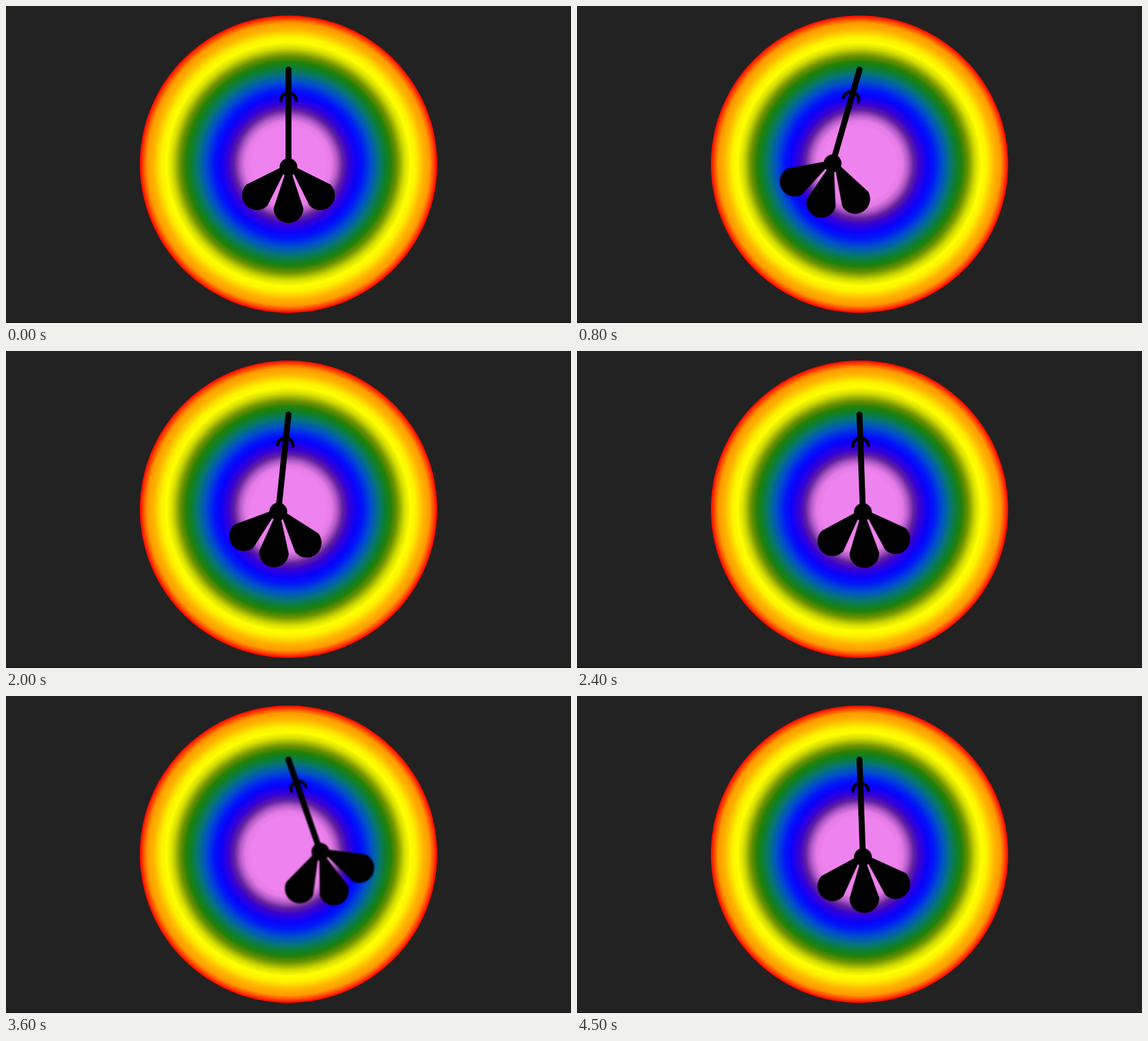
Write an HTML page that moves like this. It is 950 px wide and 533 px high and loops after 4.6 s.

```html
<!DOCTYPE html>
<html lang="en">
<head>
<meta charset="utf-8">
<title>Rainbow pendulum</title>
<style>
  html, body { margin: 0; width: 100%; height: 100%; overflow: hidden; background: #222; }
  svg { display: block; width: 950px; height: 533px; }
</style>
</head>
<body>
<svg viewBox="0 0 950 533">
  <defs>
    <radialGradient id="rainbow" gradientUnits="userSpaceOnUse" cx="475" cy="266" r="250">
      <stop offset=".25" stop-color="#ee82ee"/>
      <stop offset=".29" stop-color="#e47be6"/>
      <stop offset=".325" stop-color="#b45bc9"/>
      <stop offset=".365" stop-color="#60209f"/>
      <stop offset=".405" stop-color="#3800d2"/>
      <stop offset=".46" stop-color="#0c00fa"/>
      <stop offset=".5" stop-color="#0016fa"/>
      <stop offset=".56" stop-color="#0052c8"/>
      <stop offset=".61" stop-color="#077478"/>
      <stop offset=".66" stop-color="#0f8024"/>
      <stop offset=".69" stop-color="#268008"/>
      <stop offset=".73" stop-color="#6e9200"/>
      <stop offset=".78" stop-color="#d4dc00"/>
      <stop offset=".82" stop-color="#ffff00"/>
      <stop offset=".855" stop-color="#fff200"/>
      <stop offset=".91" stop-color="#ffb400"/>
      <stop offset=".95" stop-color="#ff9a00"/>
      <stop offset=".975" stop-color="#ff5000"/>
      <stop offset="1" stop-color="#ff0000"/>
    </radialGradient>
    <path id="leaf" d="M475 265 L450 340 A25 25 0 1 0 500 340 Z"/>
  </defs>
  <rect width="950" height="533" fill="#222"/>
  <rect y="532" width="950" height="1" fill="#111"/>
  <circle cx="475" cy="266" r="250" fill="url(#rainbow)"/>
  <g id="pendulum">
    <g fill="none" stroke="#000" stroke-linecap="round">
      <path d="M475 107 V271" stroke-width="10"/>
      <path d="M462 159.5 A13 13 0 0 1 488 159.5" stroke-width="5"/>
    </g>
    <circle cx="475" cy="271" r="15"/>
    <use href="#leaf"/>
    <use href="#leaf" transform="rotate(45 475 265)"/>
    <use href="#leaf" transform="rotate(-45 475 265)"/>
  </g>
</svg>
<script>
  const LOOP = 4600, STEP = 100, HALF = LOOP / STEP / 2;
  const SPEED = 2, TURN = 3.2; // degrees per step, steps spent slowing down
  const pendulum = document.getElementById("pendulum");

  // Steady swing with a rounded turn at each end
  function angleAt(step) {
    const side = step < HALF ? 1 : -1;
    const d = Math.abs(step % HALF - HALF / 2);
    const lag = d > TURN ? d : (TURN + d * d / TURN) / 2;
    return side * SPEED * (HALF / 2 - lag);
  }

  function draw(now) {
    const angle = angleAt(Math.floor(now % LOOP / STEP));
    pendulum.setAttribute("transform", `rotate(${angle} 475 107)`);
    pendulum.style.filter = angle ? `blur(${Math.abs(angle) / 22}px)` : "none";
  }

  const start = performance.now();
  function tick() {
    draw(performance.now() - start);
    requestAnimationFrame(tick);
  }
  tick();
</script>
</body>
</html>
```
